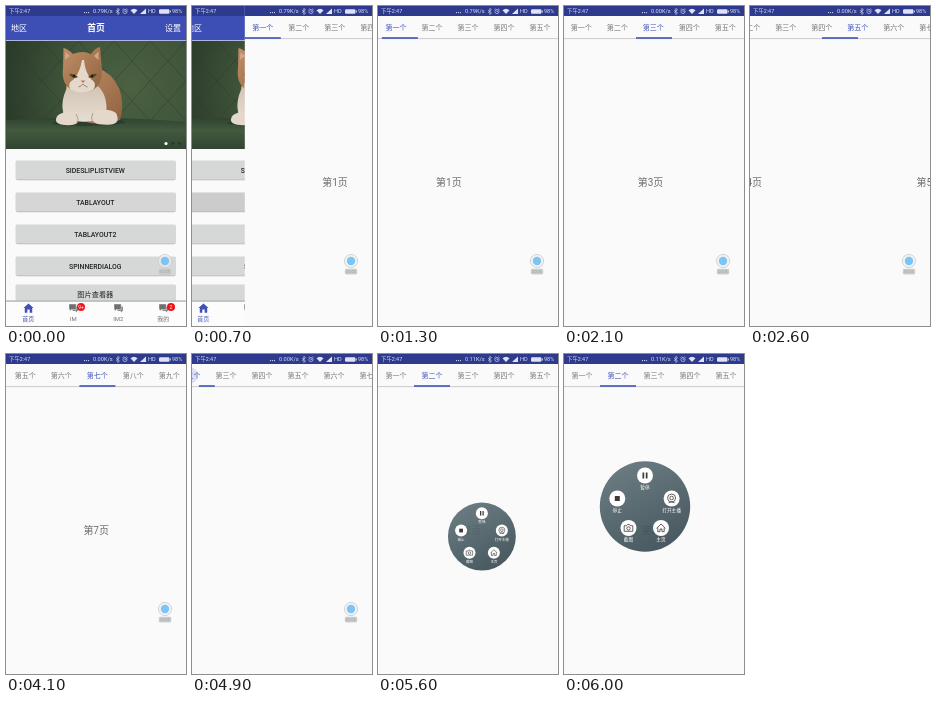
An HTML page that plays this animation: 180 px wide and 320 px high, repeating every 6.1 s.

```html
<!DOCTYPE html>
<html lang="zh-CN">
<head>
<meta charset="utf-8">
<style>
html,body{margin:0;width:100%;height:100%;overflow:hidden;background:#fafafa}
svg{display:block;width:100%;height:100%}
text{font-family:Roboto,"Noto Sans CJK SC","Noto Sans CJK",sans-serif}
.m{text-anchor:middle}
</style>
</head>
<body>
<svg id="stage" viewBox="0 0 180 320">
<defs>
<radialGradient id="sofa" gradientUnits="userSpaceOnUse" cx="125" cy="80" r="125">
<stop offset="0" stop-color="#4b6141"/><stop offset=".5" stop-color="#40553a"/><stop offset="1" stop-color="#2c3c2b"/>
</radialGradient>
<linearGradient id="seat" x1="0" y1="0" x2="0" y2="1">
<stop offset="0" stop-color="#2f4230"/><stop offset=".4" stop-color="#425a3f"/><stop offset="1" stop-color="#2f4431"/>
</linearGradient>
<linearGradient id="fur" x1="0" y1="0" x2="1" y2="1">
<stop offset="0" stop-color="#c08f66"/><stop offset="1" stop-color="#8f6240"/>
</linearGradient>
<linearGradient id="chest" x1="0" y1="0" x2="0" y2="1">
<stop offset="0" stop-color="#d3c4b4"/><stop offset="1" stop-color="#e6ddd2"/>
</linearGradient>
<linearGradient id="dial" x1="0" y1="0" x2=".5" y2="1">
<stop offset="0" stop-color="#62757b"/><stop offset="1" stop-color="#3c4d55"/>
</linearGradient>
<pattern id="tuft" width="36" height="40" patternUnits="userSpaceOnUse" y="35">
<path d="M0 0L18 20L36 0M0 40L18 20L36 40" fill="none" stroke="#26372a" stroke-width="1" opacity=".45"/>
</pattern>
<clipPath id="banner"><rect y="35" width="180" height="108"/></clipPath>
</defs>
<g id="home"></g>
<g id="tabs"></g>
<g id="status"></g>
<g id="ball"></g>
<g id="menu"></g>
</svg>
<script>
const LOOP = 6100, W = 180, TAB = 36;
const BLUE = '#3f51b5', DEEP = '#2d3a8e', GREY = '#757575';
const $ = id => document.getElementById(id);
const set = (id, k, v) => $(id).setAttribute(k, v);
const clamp = (v, a = 0, b = 1) => Math.min(b, Math.max(a, v));
const span = (t, start, dur) => clamp((t - start) / dur);
const mix = (a, b, u) => a + (b - a) * u;
const outPow = (u, n) => 1 - (1 - u) ** n;
const move = (id, x, y = 0) => set(id, 'transform', `translate(${x.toFixed(2)} ${y.toFixed(2)})`);

const text = (s, x, y, size, fill, extra = 'class="m"') =>
  `<text x="${x}" y="${y}" font-size="${size}" fill="${fill}" ${extra}>${s}</text>`;
const rect = (x, y, w, h, fill, extra = '') =>
  `<rect x="${x}" y="${y}" width="${w}" height="${h}" fill="${fill}" ${extra}/>`;
const circle = (x, y, r, fill, extra = '') =>
  `<circle cx="${x}" cy="${y}" r="${r}" fill="${fill}" ${extra}/>`;
const path = (d, fill, extra = '') => `<path d="${d}" fill="${fill}" ${extra}/>`;
const group = (x, y, body) => `<g transform="translate(${x} ${y})">${body}</g>`;

function cat() {
  const fur = 'url(#fur)', cream = '#e4d8cb';
  return `<g clip-path="url(#banner)">` +
    rect(0, 35, W, 109, 'url(#sofa)') + rect(0, 35, W, 80, 'url(#tuft)') +
    path('M0 114Q90 108 180 116V144H0Z', 'url(#seat)') +
    path('M46 118Q82 123 120 117L112 112H54Z', '#25352a', 'opacity=".6"') +
    // body, chest and paws
    path('M60 80L92 62Q106 67 113 82Q119 98 114 114Q98 119 84 117Q58 112 60 80Z', fur) +
    path('M62 80Q78 90 92 80Q104 92 99 113Q80 118 60 114Q52 98 62 80Z', 'url(#chest)') +
    path('M54 108Q62 103 70 108Q75 118 66 119Q49 120 50 113Q51 109 54 108Z', cream) +
    path('M88 106Q101 101 110 107Q115 117 105 118.500Q85 120 86 111Z', cream) +
    path('M70 108Q74 114 70 118M87 107Q84 112 87 117', 'none', 'stroke="#a39281" stroke-width=".8"') +
    // head
    path('M57 62L57.500 42Q62 43 67 48Q77 44 85 48Q89 42 94 41L96 63Q97 78 87 84Q77 89 66 84Q55 78 57 62Z', fur) +
    path('M59 54L59.500 46L64 50ZM92.500 54L92.500 45.500L88 50Z', '#d3a692') +
    path('M76 54Q74 66 68 73Q60 78 65 84Q76 90 87 84Q92 78 85 73Q79 66 78 54Z', cream) +
    path('M63 68Q68 67 72 71Q67 74 63 68ZM82 71Q86 67 91 68Q87 74 82 71Z', '#5b4a27') +
    circle(68, 70, 1.2, '#1e1812') + circle(86.2, 70, 1.2, '#1e1812') +
    path('M74.800 74.500H79.200L77 77Z', '#b77365') +
    path('M72.500 81Q75.500 80 77 78Q78.500 80 81.500 81', 'none', 'stroke="#7f6250" stroke-width=".7"') +
    circle(160, 137.5, 1.6, '#fff') + circle(167, 137.5, 1.3, '#25352a') + circle(173.5, 137.5, 1.3, '#25352a') + '</g>';
}

function chat(x) {
  return group(x, 302,
    path('M-1 -1.500H4.500V3H3.600V4.600L1.800 3H-1Z', '#8d8d8d') +
    path('M-4.500 -4H2.700V1.500H-2L-3.700 3.200V1.500H-4.500Z', '#707070', 'stroke="#fff" stroke-width=".4"'));
}

function home() {
  const names = ['SIDESLIPLISTVIEW', 'TABLAYOUT', 'TABLAYOUT2', 'SPINNERDIALOG', '图片查看器'];
  const tops = [154.5, 186.5, 218.5, 250.5, 278.5];
  const buttons = names.map((n, i) =>
    rect(10, tops[i] + .8, 159.5, 19, '#b5b5b5', 'rx="1.5"') +
    rect(9.5, tops[i], 160.5, 19, '#d6d7d7', 'rx="1.5"' + (i == 1 ? ' id="press"' : '')) +
    text(n, 89.3, tops[i] + 12, i == 4 ? 7.2 : 6.9, '#222', 'class="m" font-weight="500"')).join('');
  const badge = (x, s) => circle(x, 301, 4, '#f1141a') + text(s, x, 302.8, 5, '#fff');
  return rect(0, 0, W, 320, '#fafafa') + rect(0, 0, W, 34.4, '#3d4eb4') + rect(0, 0, W, 10, DEEP) +
    text('地区', 5, 25, 8, '#fff', '') +
    text('首页', 90, 25.2, 8.8, '#fff', 'class="m" font-weight="700"') +
    text('设置', 159, 25, 8, '#fff', '') +
    cat() + buttons +
    rect(0, 294.6, W, 25.4, '#fcfcfc') + rect(0, 294.6, W, .9, '#8c8c8c') +
    path('M22.500 297.500L27.500 302H26.200V306.700H23.700V303.500H21.300V306.700H18.800V302H17.500Z', BLUE) +
    chat(67.5) + chat(112.5) + chat(157.5) + badge(75, '9+') + badge(165, '2') +
    ['首页', 'IM', 'IM2', '我的'].map((s, i) =>
      text(s, 22.3 + 45 * i, 314.9, 6, i ? GREY : BLUE)).join('');
}

function tabs() {
  const nums = [...'一二三四五六七八九十'];
  return rect(0, 0, W, 320, '#fafafa') + rect(0, 0, W, 10, DEEP) +
    rect(0, 32.2, W, .9, '#c6c6c6') +
    '<g id="strip">' + circle(54, 21.5, 8, BLUE, 'id="ripple" opacity="0"') +
    nums.map((n, i) => text(`第${n}个`, TAB * i + 17.9, 24.2, 7, GREY, `class="m" id="tab${i + 1}"`)).join('') +
    rect(0, 31.2, TAB, 1.6, BLUE, 'id="bar"') + '</g>' +
    [1, 2, 3, 4, 5, 6, 7].map(n => text(`第${n}页`, 90.2, 180, 10, '#6c6c6c', `class="m" id="page${n}"`)).join('');
}

function status() {
  const ink = '#dfe2f4';
  const line = `stroke="${ink}" stroke-width=".6"`;
  return text('下午2:47', 3, 7.4, 5.4, ink, '') +
    [78.5, 80.5, 82.5].map(x => circle(x, 6.6, .6, ink)).join('') +
    text('', 87, 7.4, 5.6, ink, 'id="speed"') +
    path('M110 4L113.500 7L111.800 8.500V2.300L113.500 3.700L110 6.800', 'none', line) +
    circle(119, 5.5, 2.1, 'none', line) + path('M119 4.200V5.600H120.300M116.500 3.400L117.500 2.500M121.500 3.400L120.500 2.500', 'none', line) +
    path('M124.500 4.300Q128 1.300 131.500 4.300L128 8Z', ink) +
    path('M134 8H140V2.500Z', ink) +
    text('HD', 142, 7.4, 5.6, ink, '') +
    rect(153, 3.3, 10.5, 4.4, ink, 'rx="1.2"') + rect(164, 4.5, .8, 2, ink) +
    text('98%', 166, 7.4, 5.5, ink, '');
}

function ball() {
  return circle(0, 0, 6.6, '#eceff0', 'fill-opacity=".7" stroke="#c9cdd0" stroke-width=".8"') +
    circle(0, 0, 4.2, '#7cc4f6') +
    rect(-5.7, 8.2, 11.4, 4.8, '#d0d2d3', 'rx=".8" stroke="#b4b7b9" stroke-width=".6"') +
    text('00:05', 0, 12, 3.8, '#8f9395');
}

function menu() {
  const dark = '#3b3b3b', line = `stroke="${dark}" stroke-width=".8"`;
  const item = (x, y, label, icon) => group(x, y,
    circle(0, 0, 8, '#fff') + icon + text(label, 0, 13.3, 4.7, '#fff'));
  return circle(0, 0, 45.2, 'url(#dial)', 'opacity=".92"') +
    item(0, -31, '暂停', rect(-2.5, -3, 1.7, 6, dark) + rect(.8, -3, 1.7, 6, dark)) +
    item(-27.7, -8, '停止', rect(-2.5, -2.5, 5, 5, dark)) +
    item(26.6, -8, '打开主播', circle(0, -.5, 4, 'none', line) + circle(0, -.5, 1.8, 'none', line) +
      path('M-3 4.300Q0 2.500 3 4.300', 'none', line)) +
    item(-16.5, 21.5, '截图', path('M-4.300 -2.300H-2L-1 -3.500H1L2 -2.300H4.300V3.300H-4.300Z', 'none', line) +
      circle(0, .4, 1.7, 'none', line)) +
    item(16, 21.5, '主页', path('M-4.500 .3L0 -4L4.500 .3M-3.200 -.5V3.700H-1V1H1V3.700H3.200V-.5', 'none', line));
}

const TAP = 4810;
const swipes = [[1260, 430], [1690, 390], [2090, 390], [2480, 370], [2854, 440], [3300, 750]];
const swipe = u => outPow(u ** 1.4, 3);

function pagePos(t) {
  if (t >= TAP) return mix(7, 2, outPow(span(t, TAP, 600), 5));
  return swipes.reduce((p, [s, d]) => p + swipe(span(t, s, d)), 1);
}

// Cubic Bezier (.4, 0, .2, 1), solved for x by bisection.
function standard(x) {
  let a = 0, b = 1;
  for (let i = 0; i < 20; i++) {
    const s = (a + b) / 2;
    if (1.2 * s * (1 - s) ** 2 + .6 * s * s * (1 - s) + s ** 3 < x) a = s; else b = s;
  }
  return 3 * a * a * (1 - a) + a ** 3;
}

function draw(t) {
  const slide = outPow(span(t, 550, 450), 3);
  move('home', -15.6 * slide);
  move('tabs', W * (1 - slide));
  set('tabs', 'visibility', slide > 0 ? 'visible' : 'hidden');
  const shade = Math.round(214 - 10 * span(t, 50, 350));
  set('press', 'fill', `rgb(${shade},${shade},${shade})`);
  $('speed').textContent = t < 1500 ? '0.79K/s' : t < 5500 ? '0.00K/s' : '0.11K/s';

  const pos = pagePos(t), tapped = t >= TAP;
  let scroll = Math.max(0, (pos - 1) * TAB - 72);
  let left = (pos - 1) * TAB, right = left + TAB;
  if (t > 4050) {
    const drag = span(t, 4050, 650);
    scroll = mix(144, 66, drag * drag * (3 - 2 * drag));
  }
  if (tapped) {
    // The bar grows out of a point just right of the chosen tab.
    const u = standard(span(t, 4803, 300));
    left = mix(84, 36, u);
    right = mix(84, 72, u);
    scroll = 66 * (1 - standard(span(t, 4838, 300)));
  }
  move('strip', -scroll);
  set('bar', 'x', left.toFixed(2));
  set('bar', 'width', (right - left).toFixed(2));
  set('ripple', 'opacity', tapped ? .16 * (1 - span(t, 4880, 260)) : 0);
  const chosen = tapped ? 2 : Math.round(pos);
  for (let n = 1; n <= 10; n++) set('tab' + n, 'fill', n == chosen ? BLUE : GREY);
  for (let n = 1; n <= 7; n++) {
    const gone = tapped && n > 3 && n < 7;
    move('page' + n, gone ? 999 : (n - pos) * W);
  }

  const open = outPow(span(t, 5450, 450), 3);
  const x = mix(159, 81, open), y = mix(255, 152.5, open);
  set('ball', 'visibility', open > 0 ? 'hidden' : 'visible');
  set('menu', 'visibility', open > 0 ? 'visible' : 'hidden');
  set('menu', 'transform', `translate(${x.toFixed(2)} ${y.toFixed(2)}) scale(${mix(.15, 1, open).toFixed(3)})`);
}

for (const [id, make] of Object.entries({ home, tabs, status, ball, menu })) $(id).innerHTML = make();
move('ball', 159, 255);

const start = performance.now();
function tick() {
  draw((performance.now() - start) % LOOP);
  requestAnimationFrame(tick);
}
draw(0);
requestAnimationFrame(tick);
</script>
</body>
</html>
```
